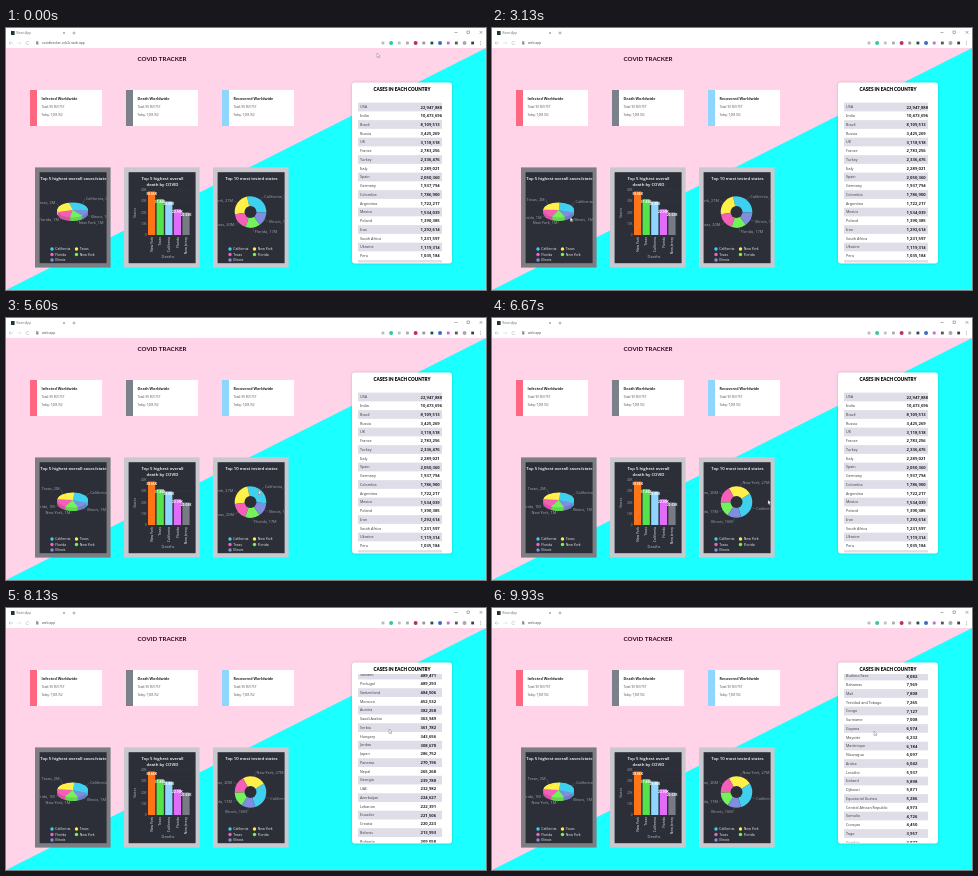
These frames come from a looping animation (480x262 px, 9.99 s). An HTML page with a canvas:

```html
<!DOCTYPE html>
<html lang="en">
<head>
<meta charset="utf-8">
<title>Covid tracker</title>
<style>
html, body { margin: 0; width: 100%; height: 100%; overflow: hidden; background: #ffd4e8; }
canvas { display: block; width: 100vw; height: 100vh; }
</style>
</head>
<body>
<canvas id="stage"></canvas>
<script>
const W = 480, H = 262, LOOP = 9990;
const canvas = document.getElementById('stage');
const c = canvas.getContext('2d');

const SANS = '"Open Sans", "Noto Sans", sans-serif';
const NOTO = '"Noto Sans", sans-serif';
const HEAD = 'Lato, sans-serif';
const HUES = ['#3fd0f0', '#fff04a', '#f45fb8', '#74f25c', '#7f8fe0'];
const PANEL = '#2c2f38';
const ROW = 8.75;

// Counts missing here fall evenly between their known neighbours.
const countries = parseRows(
  'USA 22947888,India 10473696,Brazil 8109513,Russia 3425269,UK 3118518,France 2783256,' +
  'Turkey 2336476,Italy 2289021,Spain 2050360,Germany 1937794,Colombia 1786900,' +
  'Argentina 1722217,Mexico 1534039,Poland 1390385,Iran 1292614,South Africa 1231597,' +
  'Ukraine 1119314,Peru 1035184,Netherlands,Indonesia,Czechia,Romania,Belgium,Canada,Chile,' +
  'Iraq,Bangladesh,Pakistan,Israel,Philippines,Sweden 489471,Portugal 489293,' +
  'Switzerland 484506,Morocco 452532,Austria 382258,Saudi Arabia 363949,Serbia 361782,' +
  'Hungary 343656,Jordan 308670,Japan 286752,Panama 270196,Nepal 265268,Georgia 239780,' +
  'UAE 232982,Azerbaijan 224627,Lebanon 222391,Ecuador 221506,Croatia 220223,' +
  'Belarus 213993,Bulgaria 209058,Slovakia,Dominican Republic,Denmark,Costa Rica,Bolivia,' +
  'Kazakhstan,Lithuania,Armenia,Tunisia,Kuwait,Ireland,Egypt,Moldova,Palestine,Greece,' +
  'Qatar,Guatemala,Slovenia,Malaysia,Myanmar,Oman,Honduras,Ethiopia,Venezuela,Paraguay,' +
  'Bosnia,Libyan Arab Jamahiriya 105378,Algeria 102144,Nigeria 100087,Kenya 98334,' +
  'Bahrain 95558,China 87536,Macedonia 86087,Kyrgyzstan 82380,Uzbekistan 77811,' +
  'S. Korea 69114,Albania 62971,Singapore 58929,Ghana 56230,Norway 55634,' +
  'Afghanistan 53584,Montenegro 52819,Latvia 49899,El Salvador 48905,Sri Lanka 48665,' +
  'Luxembourg 48337,Finland,Uganda,Estonia,Australia,Namibia,Zambia,Cyprus,Cameroon,Sudan,' +
  'Ivory Coast,Mozambique,Zimbabwe,Senegal,DRC,Angola,Madagascar,French Polynesia,' +
  'Botswana,Mauritania,Cuba,Malta,Maldives,Guinea,French Guiana,Jamaica,Tajikistan,' +
  'Cabo Verde,Syria,Eswatini,Belize,Thailand,Haiti,Rwanda,Gabon,Hong Kong,Réunion,' +
  'Guadeloupe,Andorra,Burkina Faso 8082,Bahamas 7969,Mali 7808,Trinidad and Tobago 7265,' +
  'Congo 7127,Suriname 7008,Guyana 6574,Mayotte 6232,Martinique 6184,Nicaragua 6097,' +
  'Aruba 6042,Lesotho 5937,Iceland 5898,Djibouti 5871,Equatorial Guinea 5286,' +
  'Central African Republic 4973,Somalia 4726,Curaçao 4450,Togo 3957,Gambia 3877');

function parseRows(list) {
  const rows = list.split(',').map(s => {
    const m = s.match(/^(.*?) ?(\d*)$/);
    return { name: m[1], n: +m[2] };
  });
  let last = 0;
  rows.forEach((r, i) => {
    if (!r.n) return;
    const a = rows[last].n;
    for (let k = last + 1; k < i; k++)
      rows[k].n = Math.round(a * Math.pow(r.n / a, (k - last) / (i - last)));
    last = i;
  });
  return rows;
}

// Interpolates keys [time, ...values]; eased keys come to rest at each stop.
function track(keys, t, eased) {
  if (t <= keys[0][0]) return keys[0].slice(1);
  for (let i = 1; i < keys.length; i++) {
    const a = keys[i - 1], b = keys[i];
    if (t > b[0]) continue;
    let p = (t - a[0]) / (b[0] - a[0]);
    if (eased) p = p * p * (3 - 2 * p);
    return a.slice(1).map((v, k) => v + (b[k + 1] - v) * p);
  }
  return keys[keys.length - 1].slice(1);
}

const POINTER = [
  [70, 371, 25], [500, 240, 60], [1000, 83, 84], [1070, 82, 84], [1130, 82, 85],
  [1330, 82, 85], [1800, 82, 159], [2070, 81, 159], [2450, 82, 179], [3000, 79, 189],
  [3400, 76, 190], [3950, 148, 179], [4330, 148, 179], [4930, 155, 182],
  [5200, 155, 182], [5550, 252, 172], [6130, 276, 181], [6670, 276, 182],
  [7000, 382, 106], [7250, 383, 120], [8130, 383, 121], [9070, 382, 123]
];
const PIE_TURN = [[2450, 50], [3400, 30]];
const RING_TURN = [[5550, 50], [6130, -20]];
const SCROLL = [[7200, 0], [7350, 20], [8130, 274], [8600, 462], [9070, 675],
  [9500, 920], [9930, 1183.5]];

function box(x, y, w, h, fill) {
  c.fillStyle = fill;
  c.fillRect(x, y, w, h);
}
function dot(x, y, r, fill) {
  c.fillStyle = fill;
  c.beginPath();
  c.arc(x, y, r, 0, 7);
  c.fill();
}
function line(pts, color, width) {
  c.strokeStyle = color;
  c.lineWidth = width;
  c.beginPath();
  pts.forEach(([x, y], i) => i ? c.lineTo(x, y) : c.moveTo(x, y));
  c.stroke();
}
function text(s, x, y, size, fill, align = 'left', font = SANS, weight = 400) {
  c.font = `${weight} ${size}px ${font}`;
  c.fillStyle = fill;
  c.textAlign = align;
  c.textBaseline = 'alphabetic';
  c.fillText(s, x, y + size * 0.36);
}
function upright(s, x, y, size, fill, align) {
  c.save();
  c.translate(x, y);
  c.rotate(-Math.PI / 2);
  text(s, 0, 0, size, fill, align);
  c.restore();
}
function clipped(x, y, w, h, draw) {
  c.save();
  c.beginPath();
  c.rect(x, y, w, h);
  c.clip();
  draw();
  c.restore();
}
function cross(x, y, r, color) {
  line([[x - r, y - r], [x + r, y + r]], color, 0.5);
  line([[x + r, y - r], [x - r, y + r]], color, 0.5);
}

function browser(t) {
  box(0, 0, W, 20, '#fff');
  box(5, 3, 3.6, 4, '#20343c');
  text('React App', 10.5, 5, 3.1, '#777', 'left', NOTO);
  cross(58, 5, 1, '#777');
  line([[66.5, 5], [69.5, 5]], '#666', 0.5);
  line([[68, 3.5], [68, 6.5]], '#666', 0.5);
  line([[448.5, 4.5], [451.5, 4.5]], '#666', 0.5);
  c.strokeRect(461, 3, 2.6, 2.6);
  cross(475, 4.4, 1.4, '#666');

  line([[7, 15], [3, 15], [4.6, 13.4]], '#aaa', 0.5);
  line([[3, 15], [4.6, 16.6]], '#aaa', 0.5);
  line([[11, 15], [15, 15], [13.4, 13.4]], '#d5d5d5', 0.5);
  line([[15, 15], [13.4, 16.6]], '#d5d5d5', 0.5);
  c.strokeStyle = '#aaa';
  c.beginPath();
  c.arc(21.5, 15, 1.6, 0.4, 5.8);
  c.stroke();
  box(30.2, 14.5, 2.2, 2, '#888');
  c.strokeStyle = '#888';
  c.strokeRect(30.7, 13.4, 1.2, 1.4);
  text(t < 1330 ? 'covidtracker-ccb2c.web.app' : 'web.app', 36, 15, 3.3, '#555', 'left', NOTO);

  ['#bbb', '#35c8a0', '#b5c8b5', '#aaa', '#c03050', '#999', '#294a55', '#3d68c8',
    '#d45fd0', '#555', '#aaa', '#344450'].forEach((hue, i) => {
    const x = 377 + i * 8.15;
    if (i % 3 === 1) dot(x, 15, 2, hue);
    else box(x - 1.4, 13.6, 2.8, 2.8, hue);
  });
  for (let i = -1; i < 2; i++) dot(474.5, 15 + i * 1.5, 0.4, '#777');
}

function page() {
  box(0, 20, W, H - 20, '#ffd4e8');
  c.fillStyle = '#1affff';
  c.beginPath();
  c.moveTo(W, 20);
  c.lineTo(W, H);
  c.lineTo(0, H);
  c.fill();
  text('COVID TRACKER', 156, 31, 6.2, '#2a0a1c', 'center', HEAD, 700);
}

function card(x, title, hue) {
  box(x, 62, 72, 36, '#fff');
  box(x, 62, 7, 36, hue);
  text(title, x + 11.5, 71, 3.7, '#222', 'left', SANS, 700);
  text('Total: 90 569 757', x + 11.5, 79, 2.9, '#555', 'left', NOTO);
  text('Today: 7,005 762', x + 11.5, 87.5, 2.7, '#555', 'left', NOTO);
}

function panel(x, frame, title, draw) {
  box(x, 139.4, 75.6, 100.2, frame);
  box(x + 4.6, 144.2, 67, 91, PANEL);
  clipped(x + 4.6, 144.2, 67, 91, () => {
    title.forEach((s, i) => text(s, x + 38.5, 150.9 + i * 5.8, 4.25, '#fff', 'center', SANS, 600));
    draw(x);
  });
}

function legend(x, names) {
  names.forEach((s, i) => {
    const lx = x + 17 + (i % 2) * 24.5, ly = 221 + Math.floor(i / 2) * 5.5;
    dot(lx, ly, 1.7, HUES[i]);
    text(s, lx + 3.3, ly, 3.4, '#f2f2f2');
  });
}

// Calls draw with each share's hue index and its start, end and middle angle.
function shares(values, mid, draw) {
  const unit = Math.PI * 2 / values.reduce((a, b) => a + b);
  let from = mid * Math.PI / 180 - values[0] * unit / 2;
  values.forEach((v, i) => {
    const to = from + v * unit;
    draw(i, from, to, (from + to) / 2);
    from = to;
  });
}
function slices(cx, cy, rx, ry, values, mid, shade) {
  shares(values, mid, (i, from, to) => {
    c.beginPath();
    c.moveTo(cx, cy);
    c.ellipse(cx, cy, rx, ry, 0, -to, -from);
    c.closePath();
    c.fillStyle = HUES[i];
    c.fill();
    if (shade) {
      c.fillStyle = 'rgba(0,0,0,.13)';
      c.fill();
    }
  });
}
function sliceLabels(cx, cy, rx, up, down, edgeX, edgeY, names, values, mid) {
  shares(values, mid, (i, from, to, m) => {
    const cos = Math.cos(m), sin = Math.sin(m);
    const x = cx + rx * cos, y = cy - (sin > 0 ? up : down) * sin;
    line([[cx + edgeX * cos, cy - edgeY * sin], [x, y]], '#73767e', 0.35);
    text(`${names[i]}, ${Math.round(values[i])}M`, x + (cos > 0 ? 1 : -1), y, 3.9,
      '#a1a3a9', cos > 0 ? 'left' : 'right');
  });
}

const CASE_STATES = ['California', 'Texas', 'Florida', 'New York', 'Illinois'];
const CASES = [2.4, 2, 1.45, 1.1, 1];
const TEST_STATES = ['California', 'New York', 'Texas', 'Florida', 'Illinois'];
const TESTS = [33, 27, 20, 17, 16];

function pie(x, t) {
  const mid = track(PIE_TURN, t, true)[0], cx = x + 37.7, cy = 182;
  sliceLabels(cx, cy + 1, 19, 16, 12, 15, 8, CASE_STATES, CASES, mid);
  for (let d = 3.5; d > 0; d -= 0.5) slices(cx, cy + d, 15.3, 7.5, CASES, mid, true);
  slices(cx, cy, 15.3, 7.5, CASES, mid);
  legend(x, CASE_STATES);
}

function ring(x, t) {
  const mid = track(RING_TURN, t, true)[0], cx = x + 37.5;
  sliceLabels(cx, 184, 20, 20, 20, 15, 15, TEST_STATES, TESTS, mid);
  slices(cx, 184, 15.8, 15.8, TESTS, mid);
  dot(cx, 184, 6, PANEL);
  legend(x, TEST_STATES);
}

const BARS = [['New York', 38.66, '#ff7417'], ['Texas', 31.86, '#55e34c'],
  ['California', 29.8, '#8ed6ff'], ['Florida', 22.9, '#e06cf8'],
  ['New Jersey', 20.03, '#777b83']];

function bars(x, t, px, py) {
  const base = 207, scale = 1.125;
  for (let k = 0; k < 5; k++) {
    const y = base - k * 10 * scale;
    text(k ? k * 10 + 'K' : '0', x + 22.5, y, 3.2, '#a1a3a9', 'right');
    line([[x + 23.5, y], [x + 68, y]], '#3c3f48', 0.3);
  }
  upright('States', x + 11, 185, 3.6, '#b6b8bd', 'center');
  text('Deaths', x + 44, 228.5, 3.9, '#b6b8bd', 'center');
  let hover = null;
  BARS.forEach(([name, v, hue], i) => {
    const bx = x + 24 + i * 8.6, h = v * scale;
    box(bx, base - h, 7.2, h, hue);
    upright(name, bx + 3.6, 209, 3.4, '#e8e8ea', 'right');
    if (px >= bx && px < bx + 8.6 && py > base - h && py < base) {
      hover = `${name}, ${v.toFixed(1)}K`;
      for (let y = base - h + 1; y < base; y += 2)
        for (let k = 0; k < 3; k++) box(bx + 1 + k * 2.2, y, 0.8, 0.8, 'rgba(255,235,205,.75)');
    }
  });
  BARS.forEach(([, v], i) =>
    text(v.toFixed(2) + 'K', x + 27.6 + i * 8.6, base - v * scale + 2.4, 3.3, '#fff', 'center', SANS, 700));
  if (hover) {
    c.font = `400 3.3px ${SANS}`;
    const w = c.measureText(hover).width + 3;
    box(px + 3.5, py + 2, w, 6, '#25272e');
    text(hover, px + 5, py + 5, 3.3, '#fff');
  }
}

function table(t) {
  c.save();
  c.shadowColor = 'rgba(0,0,0,.18)';
  c.shadowBlur = 3;
  c.fillStyle = '#fff';
  c.beginPath();
  c.roundRect(346, 54.5, 100, 181, 3);
  c.fill();
  c.restore();
  const top = 79 - track(SCROLL, t)[0];
  clipped(346, 66, 100, 168.5, () => {
    countries.forEach((r, i) => {
      const y = top + i * ROW;
      if (y < 58 || y > 244) return;
      if (i % 2 === 0) box(352, y - ROW / 2, 84, ROW, '#dfdee8');
      text(r.name, 354, y, 3.7, '#444', 'left', NOTO);
      text(r.n.toLocaleString('en-US'), 414.5, y, 4.2, '#222', 'left', SANS, 700);
    });
  });
  text('CASES IN EACH COUNTRY', 396, 61, 4.6, '#000', 'center', HEAD, 900);
}

function pointer(x, y) {
  c.beginPath();
  [[0, 0], [0, 4.4], [1.1, 3.5], [1.8, 4.9], [2.4, 4.6], [1.8, 3.2], [3.1, 3.1]]
    .forEach(([a, b]) => c.lineTo(x + a, y + b));
  c.closePath();
  c.fillStyle = '#fff';
  c.fill();
  c.strokeStyle = '#666';
  c.lineWidth = 0.4;
  c.stroke();
}

function draw(t) {
  const [px, py] = track(POINTER, t, true);
  page();
  browser(t);
  card(24, 'Infected Worldwide', '#ff667f');
  card(120, 'Death Worldwide', '#7b818a');
  card(216, 'Recovered Worldwide', '#8fd6ff');
  panel(29, '#7d7e84', ['Top 5 highest overall cases/state'], x => pie(x, t));
  panel(118, '#c8c8ce', ['Top 5 highest overall', 'death by COVID'], x => bars(x, t, px, py));
  panel(207, '#c8c8ce', ['Top 10 most tested states'], x => ring(x, t));
  table(t);
  pointer(px, py);
}

function frame() {
  const ratio = window.devicePixelRatio || 1;
  const w = Math.round(innerWidth * ratio), h = Math.round(innerHeight * ratio);
  if (canvas.width !== w || canvas.height !== h) {
    canvas.width = w;
    canvas.height = h;
  }
  c.setTransform(w / W, 0, 0, h / H, 0, 0);
  draw(performance.now() % LOOP);
  requestAnimationFrame(frame);
}
frame();
</script>
</body>
</html>
```
